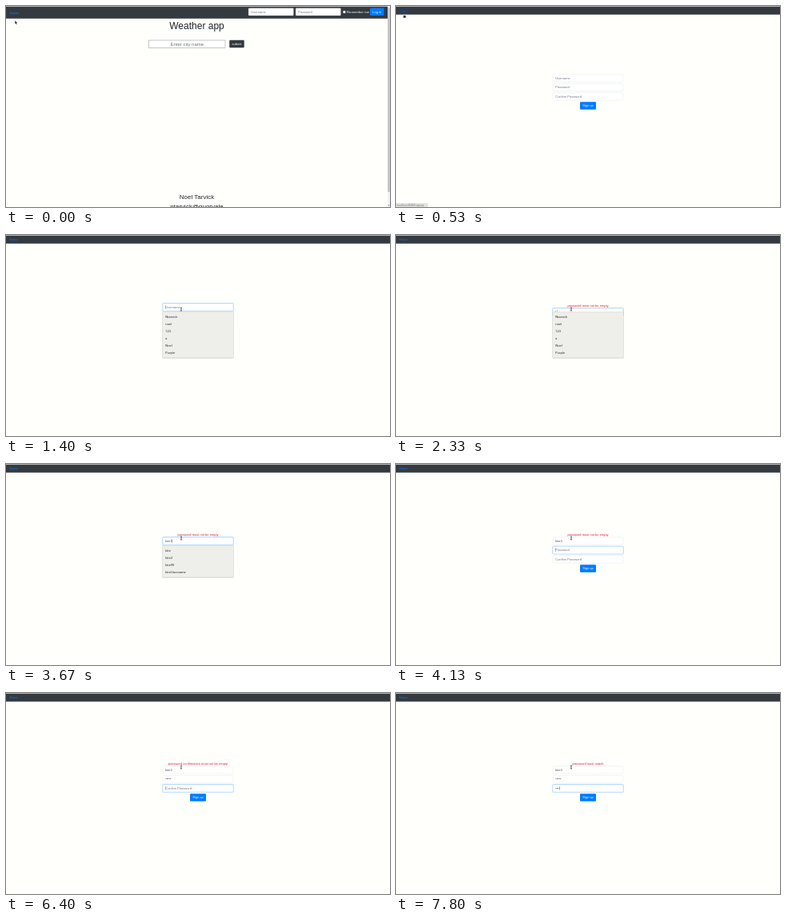
These frames come from a looping animation (480 by 252 pixels, 8 s). An HTML page:

```html
<!DOCTYPE html>
<html lang="en">
<head>
<meta charset="utf-8">
<title>Sign up form</title>
<style>
html, body { margin: 0; width: 100%; height: 100%; overflow: hidden; background: #fffffc; }
/* The desktop is laid out at full size and shown at a quarter. */
#desk { position: absolute; width: 1920px; height: 1008px; overflow: hidden; transform: scale(.25); transform-origin: 0 0;
  font: 16px/24px "Liberation Sans", Arial, sans-serif; color: #212529; background: #fffffc; }
#desk * { box-sizing: border-box; }
.page, .abs, .field, .btn, nav, #desk svg { position: absolute; }
.page { inset: 0; }
nav { left: 0; top: 0; width: 100%; background: #343a40; border-top: 3px solid #dcdcda; }
nav a { position: absolute; left: 16px; color: #007bff; }
nav a.hover { color: #0056b3; text-decoration: underline; }
.field { height: 38px; padding: 6px 12px; border: 1px solid #ced4da; border-radius: 4px; background: #fff; color: #495057; white-space: nowrap; }
.hint { color: #6c757d; }
.focus { border-color: #80bdff; box-shadow: 0 0 0 3.2px rgba(0, 123, 255, .25); }
.caret { display: inline-block; width: 1px; height: 19px; margin-right: -1px; vertical-align: -4px; background: #000; }
.btn { height: 38px; line-height: 38px; border-radius: 4px; background: #007bff; color: #fff; text-align: center; }
.mid { left: 0; width: 1908px; text-align: center; }
#form { left: 784px; width: 352px; }
#form .field { width: 352px; }
#error { left: -100px; width: 552px; text-align: center; color: crimson; }
#list { left: 783px; width: 354px; padding: 7px 13px; border: 1px solid #c9c9c4; background: #eeeeea; color: #222;
  font: 15.5px/36px "Noto Sans", sans-serif; box-shadow: 0 2px 4px rgba(0, 0, 0, .25); }
#status { left: 0; bottom: 0; width: 160px; height: 20px; padding-left: 4px; border-radius: 0 4px 0 0;
  background: #e2e2e0; color: #777; font: 13px/20px "Noto Sans", sans-serif; white-space: nowrap; }
</style>
</head>
<body>
<div id="desk">
  <div class="page" id="weather">
    <nav style="height:63px;width:1908px"><a id="signup" style="top:19px">Signup</a></nav>
    <div class="field hint" style="left:1212px;top:10px;width:226px">Username</div>
    <div class="field hint" style="left:1448px;top:10px;width:226px">Password</div>
    <div class="abs" style="left:1685px;top:23px;width:13px;height:13px;border:1px solid #777;border-radius:2px;background:#fff"></div>
    <div class="abs" style="left:1704px;top:17px;font-size:17px;color:#fff">Remember me</div>
    <div class="btn" style="left:1820px;top:10px;width:70px">Log in</div>
    <div class="abs mid" style="top:71px;font-size:48px;line-height:58px">Weather app</div>
    <div class="abs hint" style="left:713px;top:171px;width:384px;height:39px;border:2px solid #8a8f8a;background:#fff;font-size:24px;line-height:35px;text-align:center">Enter city name</div>
    <div class="btn" style="left:1117px;top:171px;width:74px;background:#343a40">submit</div>
    <div class="abs mid" style="top:934px;font-size:32px;line-height:48px">Noel Tarvick<br>ntarvick@quorvale</div>
    <div class="abs" style="left:1908px;top:0;width:12px;height:1008px;background:#f1f1f1"></div>
    <div class="abs" style="left:1909px;top:8px;width:10px;height:924px;background:#c1c1c1"></div>
    <div class="abs" style="left:1910px;top:998px;border:4px solid transparent;border-top:5px solid #555"></div>
  </div>
  <div class="page" id="register">
    <nav style="height:43px"><a id="home" style="top:7px">Home</a></nav>
    <div class="abs" id="form">
      <div class="abs" id="error"></div>
      <div id="rows"></div>
    </div>
    <div class="abs" id="list"></div>
  </div>
  <div class="abs" id="status">localhost:8080/signup</div>
  <svg id="cursor" width="24" height="24" style="overflow:visible;left:0;top:0" stroke-linejoin="round">
    <path id="arrow" d="M0 0V17L4 13.5L7 20L10 18.500L7 12.500H12.500Z" fill="#111" stroke="#fff"/>
    <path id="hand" d="M-1 0H2V7L11 9V15L8 20H0L-5 12L-3 10L-1 12Z" fill="#333" stroke="#fff"/>
    <path id="beam" d="M-3 -8H3M0 -8V8M-3 8H3" fill="none" stroke="#000" stroke-width="2.500"/>
  </svg>
</div>
<script>
const LOOP = 8000, STEP = 1000 / 15, BLINK = 600;
const $ = id => document.getElementById(id);
const show = (id, on) => { $(id).style.display = on ? '' : 'none'; };
const setHtml = (el, html) => { if (el.shown !== html) el.innerHTML = el.shown = html; };

// Each field: when it gains focus, what is typed, and the time of every key.
const fields = [
  { hint: 'Username', focus: 1400, text: 'kite3', keys: [2330, 2400, 2530, 2670, 3670] },
  { hint: 'Password', focus: 4130, text: '•••••', keys: [5200, 5330, 5530, 5670, 6070] },
  { hint: 'Confirm Password', focus: 6400, text: '••••', keys: [7270, 7470, 7600, 7800] }
];
const messages = [
  [2330, 'password must not be empty'],
  [5200, 'password confirmation must not be empty'],
  [7270, 'password must match']
];
const history = ['Ntarvick', 'noel', '123', 'a', 'Noel', 'Purple'];
const matches = ['kite', 'kite2', 'kite99', 'kiteUsername'];

fields.forEach((f, i) => {
  f.el = document.createElement('div');
  f.el.style.top = i * 46 + 'px';
  $('rows').append(f.el);
});
$('rows').insertAdjacentHTML('beforeend', '<div class="btn" style="left:136px;top:138px;width:80px">Sign up</div>');
$('rows').style.position = 'absolute';
$('form').style.top = '343px';

function glide(t, start, end, from, to) {
  const u = Math.min(1, Math.max(0, (t - start) / (end - start)));
  const k = 1 - (1 - u) ** 3;
  return from.map((v, i) => v + (to[i] - v) * k);
}

function drawCursor(time) {
  const t = Math.floor((time + 5) / STEP) * STEP;
  const link = [39, 40];
  const [x, y] = t < 590 ? glide(t, 0, 330, [45, 73], link) : glide(t, 600, 1200, link, [876, 372]);
  const shape = t > 920 ? 'beam' : t > 190 && t < 610 ? 'hand' : 'arrow';
  for (const id of ['arrow', 'hand', 'beam']) show(id, id === shape);
  $('cursor').style.transform = `translate(${x}px, ${y}px)`;
  const hover = shape === 'hand';
  show('status', hover);
  $('signup').className = $('home').className = hover ? 'hover' : '';
}

function drawForm(t) {
  const message = messages.filter(m => t >= m[0]).pop();
  setHtml($('error'), message ? message[1] : '');
  $('rows').style.top = message ? '24px' : '0';

  const active = fields.filter(f => t >= f.focus).pop();
  for (const f of fields) {
    const typed = f.keys.filter(k => t >= k);
    const last = typed.length ? typed[typed.length - 1] : f.focus;
    const focused = f === active;
    const caret = focused && t - last < BLINK ? '<i class="caret"></i>' : '';
    f.el.className = 'field' + (focused ? ' focus' : '') + (typed.length ? '' : ' hint');
    setHtml(f.el, typed.length ? f.text.slice(0, typed.length) + caret : caret + f.hint);
  }

  const filtered = t >= 2400;
  show('list', t >= 1400 && t < 3730);
  $('list').style.top = filtered ? '408px' : '384px';
  setHtml($('list'), (filtered ? matches : history).join('<br>'));
}

function frame(now) {
  const t = now % LOOP;
  show('weather', t < 400);
  show('register', t >= 400);
  drawForm(t);
  drawCursor(t);
  requestAnimationFrame(frame);
}
frame(0);
</script>
</body>
</html>
```
